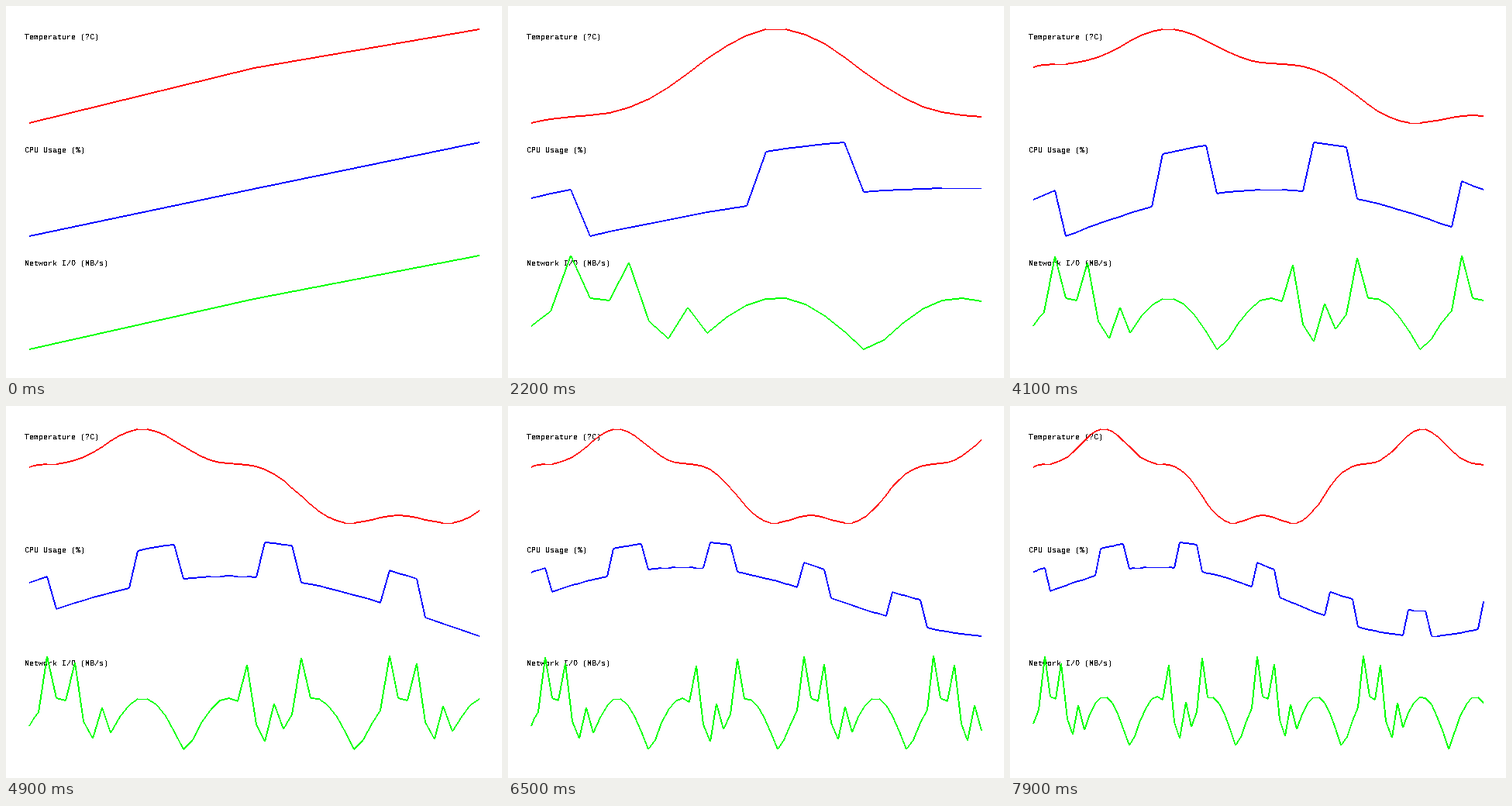
A matplotlib script for the animation above (8000 ms loop, 640x480 px).

```python
import numpy as np
import matplotlib.pyplot as plt
from matplotlib.animation import FuncAnimation
from matplotlib.collections import PolyCollection

plt.rcParams["text.hinting"] = "native"
plt.rcParams["text.hinting_factor"] = 1

W, H, DPI = 640, 480, 100
FRAMES, STEP_MS = 80, 100
LEFT, RIGHT = 30, 611
TOP, PLOT_H, PITCH = 30, 121, 146

# One sample per tick after a quick start; the clock drifts a little.
ticks = np.r_[0, 0.5, 1:FRAMES + 1]
t = np.interp(ticks, [0, 30, 40, 68, 80], [1.73, 35.15, 45.95, 76.95, 90.65])


def temperature(t):
    return np.sin(0.1 * t) + 0.2 * np.cos(0.4 * t)


def cpu_usage(t):
    return np.sin(0.06 * t) + 0.75 * (t % 15 < 5)


def network_io(t):
    base = np.abs(np.sin(0.3 * t))
    return base + (t % 3.5 < 0.5) * (0.78 + 0.05 * base)


PANELS = [("Temperature (?C)", "#ff0000", temperature(t)),
          ("CPU Usage (%)", "#0000ff", cpu_usage(t)),
          ("Network I/O (MB/s)", "#00ff00", network_io(t))]


def rescale(v, start, end):
    return np.round(start + (v - v.min()) / np.ptp(v) * (end - start))


def two_pixel_segments(x, y):
    """Strokes widened along the minor axis of each segment.

    Without antialiasing every touched pixel is filled, so the outline is
    narrowed by the slope to leave two pixels across.
    """
    quads = []
    for x0, y0, x1, y1 in zip(x[:-1], y[:-1], x[1:], y[1:]):
        w, h = abs(x1 - x0), abs(y1 - y0)
        half = max(0.05, (1 - min(w, h) / max(w, h, 1)) / 2)
        dx, dy = (0, half) if w >= h else (half, 0)
        quads.append([(x0 - dx, y0 - dy), (x1 - dx, y1 - dy),
                      (x1 + dx, y1 + dy), (x0 + dx, y0 + dy)])
    return quads


fig = plt.figure(figsize=(W / DPI, H / DPI), dpi=DPI, facecolor="white")
ax = fig.add_axes([0, 0, 1, 1])
ax.set(xlim=(0, W), ylim=(H, 0))
ax.axis("off")

traces = []
for i, (label, color, _) in enumerate(PANELS):
    ax.text(24, TOP + 13 + i * PITCH, label, family="Liberation Mono",
            size=10 * 72 / DPI, color="black", va="baseline",
            antialiased=False, zorder=1)
    trace = PolyCollection([], facecolors=color, edgecolors="none",
                           linewidths=0, antialiaseds=False, zorder=2)
    traces.append(ax.add_collection(trace, autolim=False))


def draw(frame):
    n = frame + 3
    x = rescale(t[:n], LEFT, RIGHT)
    for i, (trace, (_, _, values)) in enumerate(zip(traces, PANELS)):
        top = TOP + i * PITCH
        y = rescale(values[:n], top + PLOT_H, top)
        trace.set_verts(two_pixel_segments(x, y))
    return traces


anim = FuncAnimation(fig, draw, frames=FRAMES, interval=STEP_MS,
                     repeat=True, repeat_delay=0)
plt.show()
```
